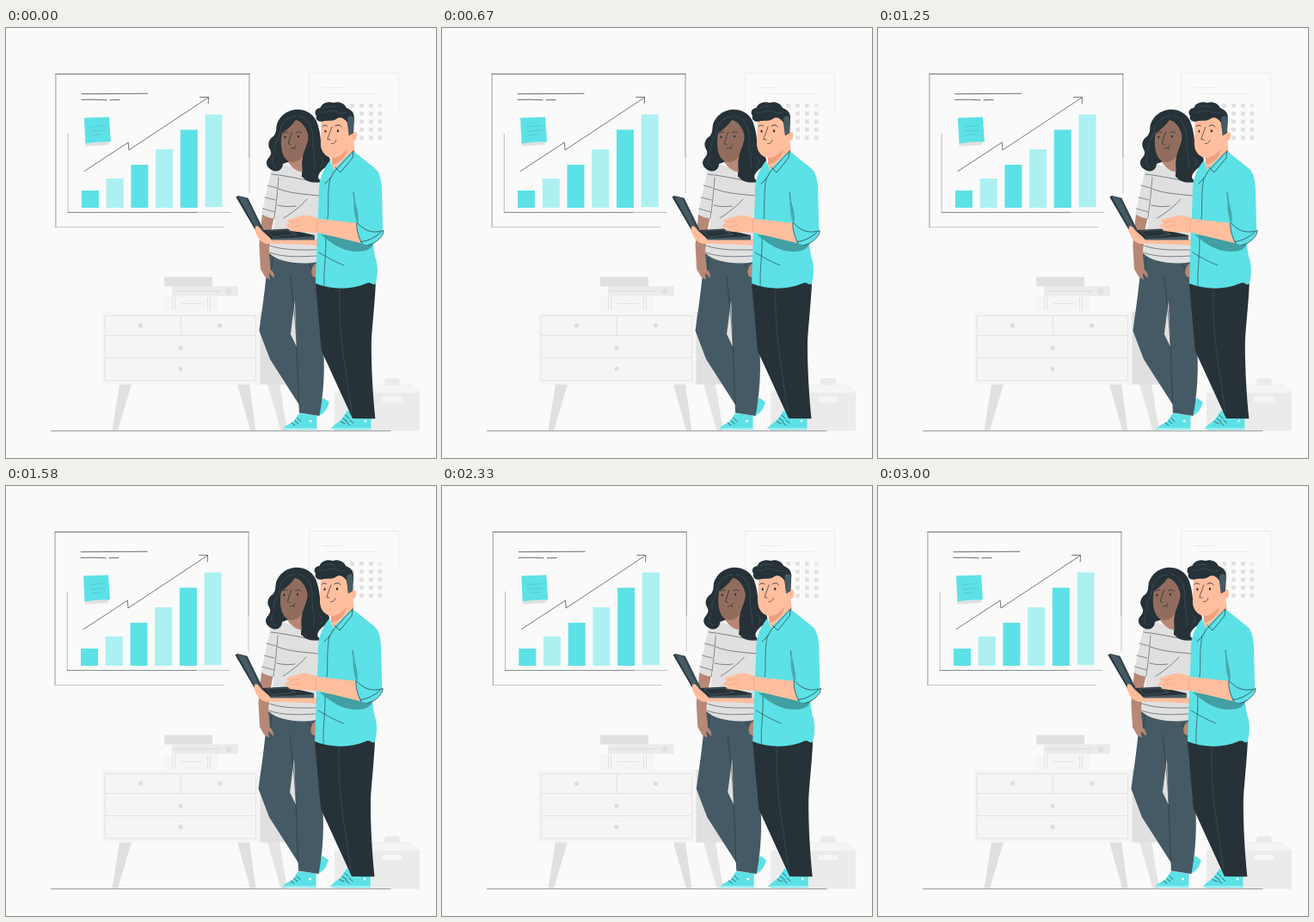
These frames come from a looping animation (500x500 px, 3.04 s). An HTML page with a canvas:

```html
<!DOCTYPE html>
<html lang="en">
<head>
<meta charset="utf-8">
<title>Team and growth chart</title>
<style>
html, body { margin: 0; width: 100%; height: 100%; overflow: hidden; background: #fafafa; }
canvas { display: block; width: 500px; height: 500px; }
</style>
</head>
<body>
<canvas id="stage" width="500" height="500"></canvas>
<script>
const ctx = document.getElementById('stage').getContext('2d');
const DARK = '#263238', SLATE = '#455a64', CYAN = '#5ce1e6', PALE = '#adf0f2';
const SKIN = '#ffbe9d', BLUSH = '#e59a7a', BROWN = '#926d5e', TAN = '#b78876';
const G1 = '#f5f5f5', G2 = '#ebebeb', G3 = '#e0e0e0';

const fill = (color, d) => {
  ctx.fillStyle = color;
  ctx.fill(new Path2D(d));
};
const line = (color, width, d) => {
  ctx.strokeStyle = color;
  ctx.lineWidth = width;
  ctx.stroke(new Path2D(d));
};
const box = (color, x, y, w, h) => {
  ctx.fillStyle = color;
  ctx.fillRect(x, y, w, h);
};
const dot = (color, x, y, rx, ry = rx) => {
  ctx.fillStyle = color;
  ctx.beginPath();
  ctx.ellipse(x, y, rx, ry, 0, 0, Math.PI * 2);
  ctx.fill();
};

function calendar() {
  line(G2, 0.9, 'M352.5 120V52.5H456.5V96');
  line(G2, 0.9, 'M368 69.5H392M373 76.5H432');
  for (let r = 0; r < 5; r++) {
    for (let c = 0; c < 7; c++) {
      box(r === 0 && c === 6 ? G2 : G3, 368 + c * 10.8, 88 + r * 9.3, 4.6, 4.6);
    }
  }
}

function cabinet() {
  fill(G3, 'M132 414H146L130 468H123.5ZM269 414H283L290.5 468H284Z');
  fill('#e4e4e4', 'M304 414H318L327 468H319.5Z');
  box(G3, 295, 330, 50, 84.5);
  box(G1, 111, 330, 184.5, 84.5);
  line(G3, 0.9, 'M115.5 334.5H290.5V410H115.5ZM116 357.5H290M116 383.5H290M203.5 335V357');
  for (const [x, y] of [[156.5, 346], [248.5, 346], [203, 372], [203, 396.5]]) dot('#dcdcdc', x, y, 2.5);
  box(G3, 184, 289.5, 56, 11);
  box(G2, 193, 300.3, 77, 11.4);
  line(G3, 1.5, 'M196 306H249');
  dot(G3, 259, 306, 3.6);
  box(G1, 184, 312, 62, 17.5);
  line(G3, 0.9, 'M193.5 313V328M196.5 313V328M234.5 313V328M237.5 313V328M204 320.5H228');
}

function crate() {
  fill(G2, 'M440 412L442 408H456L458 412V415H440Z');
  line(G3, 0.8, 'M440 412L442 408H456L458 412');
  fill(G1, 'M394 415H470L481 424.5H382Z');
  line(G2, 0.9, 'M394 415H470L481 424');
  box(G2, 382, 424, 99, 44.5);
  ctx.fillStyle = G1;
  ctx.beginPath();
  ctx.roundRect(437, 429, 24, 6.2, 3);
  ctx.fill();
}

function ground() {
  line('#6c7478', 0.7, 'M52.5 468.5H447');
}

function board() {
  line('#4b5559', 0.8, 'M58 53.5H283');
  line('#6c7478', 0.7, 'M58 53.5V231.5');
  line('#6c7478', 0.7, 'M283 53.5V150');
  line('#a3a8ab', 0.6, 'M283 150V192M58 231.5H254');
  line(DARK, 0.7, 'M88 76.7L165 76.2M88 83.4L103 83.2L117 83.8M121 83.8L132 83.5');

  fill(G3, 'M92 133L121 132L119 136L93 137.6Z');
  fill(CYAN, 'M91 104.5L120 103.5L122 132.3C112 132 102 133 92.5 134.3Z');
  line('#49b0b4', 0.45, 'M98 115L115 113.4M99 120.2L116 118.6M101 124.8L111 123.4');

  const tops = [189, 175, 159, 141, 118.3, 100.5];
  tops.forEach((y, i) => box(i % 2 ? PALE : CYAN, 88 + i * 28.72, y, 20, 209 - y - (i === 5 ? 0.8 : 0)));

  line('#8d9497', 0.6, 'M72.2 123V214.4');
  line('#4b5559', 0.7, 'M72.2 214.4H222');
  line('#8d9497', 0.6, 'M222 214.4H261');
  line(DARK, 0.65, 'M91 166.6L142.3 133L143 142L235 81M225.5 80.4H235.6L235.3 88');
}

function womanLegs() {
  fill(CYAN, 'M364 437L369 430L376 435C375 443 370 449 363 452Z');
  line('#fafafa', 0.9, 'M376 436C374 444 369 449 364 451');
  fill(CYAN, 'M322 466.8C323 463 329 461 334 458L341 448L361.5 450.5L361.5 467Z');
  line('#d9fafa', 0.8, 'M322 465.6H361');
  line(DARK, 0.7, 'M332 459L336 462M336 456.5L340 460M339 453.5L343 457.5');
  dot('#fff', 354.5, 457, 1.5);
  fill(SLATE, 'M306 262L362 270L366 330L369.5 376C371 408 368 432 364.5 451L341 447.5L340.6 437.5L307 385L294.5 352C297 334 300 314 302.5 290Z');
  fill(G3, 'M336 317L331 356L338.2 371Z');
  line(DARK, 0.6, 'M331 289C333 310 337 340 338.2 371L340.6 437M310 267C309 278 309 284 305 292M351 270C355 280 358 286 362 289');
}

function womanBody() {
  fill(TAN, 'M298 217L312 219L308 238L306 263L308 281C312 284 312 288 312 291L306 285L307 293L301 289L296 280L294.5 252Z');
  fill(TAN, 'M360 274C355 278 354 285 357 289L363 291V274Z');
  fill(G3, 'M319 156C313 157 310 161 308.5 166L297.5 216C302 220 307 221 312 221.5L315 208L310 240L306.5 262C316 272 342 276 362 272L370 180L345 167Z');
  line(DARK, 0.5, 'M317 174C316 188 315 199 312 221.5M304 183L315 186M301 197L313 200M298.5 210L312.5 214');
  line(DARK, 0.55, 'M309 170C328 172 344 176 366 180M317 187C332 193 348 193 364 195M316 206C323 208 330 208 337 207M307 253C324 259 343 258 361 258M306.5 261C322 267 342 266 361 265');
  line(DARK, 0.55, 'M323 221C333 215 344 206 350 199');
}

function womanHead() {
  fill(DARK, 'M337 94.8C326 96 318 103 315 112C314 117 315 122 311 126C305 130 304 136 307 141C310 146 307 149 304 153C301 158 305 164 311 166C317 168 322 164 322 158L345 150L344 172C350 180 358 181 367 178C361 175 363 170 367 166C371 161 377 161 377 153C376 147 369 147 367 140C366 132 366 120 361 108C356 98 346 94 337 94.8Z');
  fill(TAN, 'M331 150L347 143L347 167C340 168 334 164 328 156Z');
  fill(BROWN, 'M321 122C326 119 332 114 337 107C347 109 353 117 352 129L346 148C342 155 334 158 328 154.5C320.5 150 318.5 135 321 122Z');
  fill(DARK, 'M338 106C345 110 350 117 351.5 125C352 136 346 142 345 151C343 160 346 166 344 173L355 178L362 130L354 104Z');
  line(SLATE, 0.6, 'M337 103C327 103 319 112 318.5 122C317 130 311 134 313 143M341 102C352 105 358 117 357 130C356 142 361 151 359 163M312 148C308 153 309 160 314 162M365 150C370 153 370 157 366 161');
  line(DARK, 0.8, 'M322 122.5C324 120.8 326 120.5 328 121.3M337.5 122C339.5 120.2 342 120.4 344 122M332.5 121C331 126 329 131 328.5 134.5L331 135.5');
  dot(DARK, 324.5, 126.8, 1.1, 1.5);
  dot(DARK, 340, 126, 1.1, 1.5);
  line(DARK, 0.8, 'M331.5 140C334.5 140 336.5 138.5 337.3 136.5M335.5 139.2L336.5 141');
}

function manLegs() {
  fill(CYAN, 'M378 466C381 461 387 459 391 454L397 445L407 449L404 466Z');
  fill(CYAN, 'M380 467C382 462 391 461 397 458L405 452H424.5V467Z');
  line('#d9fafa', 0.8, 'M380 465.6H424');
  line(DARK, 0.7, 'M389 457.5L394 460M392 454L397 457.5M395 450L399 454M396 458.5L400 462M400 456L404 459.5');
  dot('#fff', 418, 457, 1.4);
  fill(DARK, 'M360 297L430 296C429 320 426 345 425 364C424.6 395 427 430 429.5 454.3L403 454L367 375.5Z');
  line(SLATE, 0.6, 'M388 303C387 338 390 364 394 392L402 446');
}

function laptop() {
  fill(SKIN, 'M300 245L363 246V253C342 252 322 250 304 251C298 250 294 246 292 242Z');
  fill(DARK, 'M299 235L327 233.5L359 241L358 246H303Z');
  fill(SLATE, 'M301 245L345 243L359 242V246.5H303Z');
  line('#65767e', 0.5, 'M304 236L327 235L338 240L311 243Z');
  fill(DARK, 'M267.5 196.5L270 195L281.5 197.8L304 244L302 247L290 235Z');
  fill(SLATE, 'M269.5 195.5L281 198.2L303 244.5L291 234Z');
  fill('#37474f', 'M281 198L304 244L302 246L279 198Z');
  fill(SKIN, 'M290 231C293 229 295 232 298 236L306 243L310 248L304 251C297 249 291 241 289.5 236Z');
  line(BLUSH, 0.5, 'M292 237L299 244M296 235L303 243');
}

function manBody() {
  fill(SKIN, 'M378 146L404 128L406 145L394 158L380 169Z');
  fill('#ef9f7d', 'M379 151C386 151 392 147 397 140C396 149 389 157 379 159Z');
  fill(CYAN, 'M404 143L429 163C434 167 436 174 437 184L438.3 234L427 252L429 265C433.5 276 432.5 289 429.5 298C424 299 424 294 419 297C401 305 378 304 360 297L362 240L364 196C363 180 367 166 377 154L381 165L399 147Z');
  line(DARK, 0.7, 'M404 143L403 151L389 168L383 162M381 168L378 174L371 181M404 143L381 168');
  line(DARK, 0.6, 'M377 174C373 196 376 211 374 222M372 241C373 262 369 281 370 300M404 191C405 205 410 214 409 225M364 261C374 267 383 272 393 276');
  fill('#47aeb2', 'M405 192C403.5 207 405 218 408 226L410 223C407.5 212 406 203 405 192Z');
  fill('#429fa3', 'M366 240C379 251 392 260 408 260C418 260 426 257 427 250L412 246Z');
  fill(SKIN, 'M410 227L365 222C357 219 350 217 345 218L330 222.5C325 224 327 226 331 226L326 229C325 232 328 233 332 232L329 235C335 238 351 237 363 238L414 250.5Z');
  line(BLUSH, 0.5, 'M331 226L343 224M332 232L344 229M362 222L361 237');
  fill(CYAN, 'M408 226L429 237L439.3 235L438 240C434 247 428 251 421 252.5L413 250.5C410 244 407 233 408 226Z');
  line(DARK, 0.7, 'M408 226C407 235 411 245 414 250.5M409 227C420 239 430 238 439.3 235.5L438 240.5C433 248 427 251 421 252.5M413 248.5C421 248 430 243 436 237.5');
}

function manHead() {
  fill(SKIN, 'M367 105L398 99L405 121C408 120 409 124 408 127C407 132 404 132 401 131C397 141 391 149 381 151C372 151 366 144 366 134Z');
  fill(DARK, 'M369 108.5C363 110 359.5 106 361 102C358 98 360 93.5 365.5 93C367 88 374 85 381 87C387 85 394 88 396 93C402 95 405 99 405 105L404 122L399 125L397 110C393 104 388 103 384 106C379 109 373 107 369 108.5Z');
  fill(SLATE, 'M397 105C400 101 403 102 404.5 105L404 122L399 125Z');
  line(SLATE, 0.6, 'M365 97C371 101 375 95 380 96C386 97 390 101 396 98M369 93C374 90 380 91 384 92');
  line(DARK, 0.9, 'M368 114.5C370 112.5 372 113 373.5 114M383 114C386 112 389 112.7 390 115');
  dot(DARK, 371.5, 120, 1.1, 1.6);
  dot(DARK, 386, 119.7, 1.1, 1.6);
  line(DARK, 0.7, 'M379 115C377 121 374.5 126 374 129.5L377 130M378.5 134.5C381 135 383.5 133 384 130.5');
  line(BLUSH, 0.6, 'M403 124.5C406 123 406 127 403.5 128');
}

// Sideways shake: one key every 300 ms, straight between keys.
const KEYS = [0, -1, 2, -4, 4, -4, 4, -4, 2, -1, 0];
const LOOP = 3040, FPS = 24, LEAD = 30;

function shift(time) {
  const step = Math.min(72, Math.floor((time + 5) * FPS / 1000));
  const pos = (step * 1000 / FPS + LEAD) % 3000 / 300;
  const i = Math.floor(pos);
  return KEYS[i] + (KEYS[i + 1] - KEYS[i]) * (pos - i);
}

function draw(time) {
  ctx.lineCap = ctx.lineJoin = 'round';
  box('#fafafa', 0, 0, 500, 500);
  calendar();
  cabinet();
  crate();
  ground();
  ctx.save();
  ctx.translate(shift(time), 0);
  board();
  womanLegs();
  womanBody();
  womanHead();
  manLegs();
  laptop();
  manBody();
  manHead();
  ctx.restore();
}

const start = performance.now();
function tick() {
  draw((performance.now() - start) % LOOP);
  requestAnimationFrame(tick);
}
tick();
</script>
</body>
</html>
```
